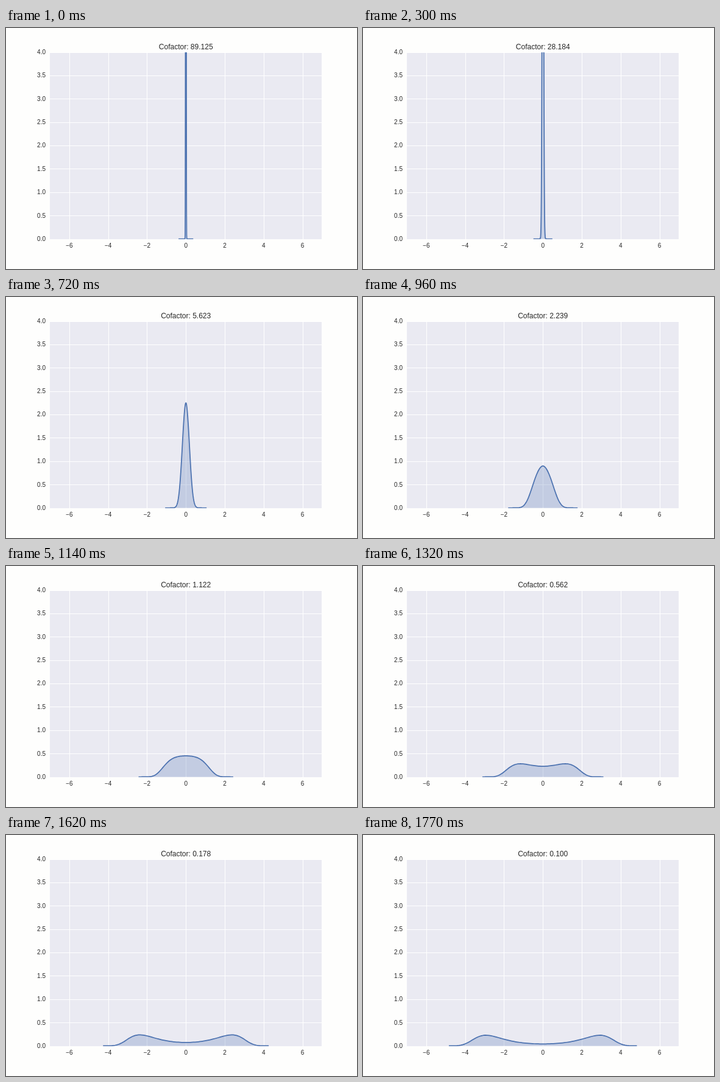
An HTML page for the animation above (1800 ms loop, 576 px wide and 396 px high).

```html
<!DOCTYPE html>
<html lang="en">
<head>
<meta charset="utf-8">
<title>Cofactor density</title>
<style>
  html, body { margin: 0; width: 576px; height: 396px; overflow: hidden; background: #fefefd; }
  svg { display: block; }
  text { font: 10px "Liberation Sans", Arial, sans-serif; fill: #262626; }
  #title { font-size: 12px; }
  #grid { stroke: #fff; stroke-width: 1; }
  #area { fill: #4c72b0; fill-opacity: .25; }
  #line { fill: none; stroke: #4c72b0; stroke-width: 1.75; stroke-linejoin: round; stroke-linecap: square; }
</style>
</head>
<body>
<svg width="576" height="396" viewBox="0 0 576 396">
  <clipPath id="axes"><rect x="72" y="40" width="446" height="307"/></clipPath>
  <rect x="72" y="40" width="446" height="307" fill="#eaeaf2"/>
  <g clip-path="url(#axes)">
    <g id="grid"></g>
    <path id="area"/>
    <path id="line"/>
  </g>
  <g id="labels"></g>
  <text id="title" x="295.2" y="35" text-anchor="middle"></text>
</svg>
<script>
const STEP = 30, STEPS = 60;
const POINTS = 100;   // samples along the curve
const REACH = 4.55;   // largest raw value
const CUT = 0.3;      // extra tail on each side
const SMOOTH = 0.1;   // kernel width relative to the spread

const byId = id => document.getElementById(id);
const px = x => 295.2 + x * 446.4 / 14;
const py = y => 346.5 - y * 306.9 / 4;
const gauss = x => Math.exp(-x * x / 2) / Math.sqrt(2 * Math.PI);

function add(parent, tag, attrs, text = "") {
  const el = document.createElementNS("http://www.w3.org/2000/svg", tag);
  for (const key in attrs) el.setAttribute(key, attrs[key]);
  el.textContent = text;
  byId(parent).append(el);
}

function drawAxes() {
  for (let v = -6; v <= 6; v += 2) {
    const x = Math.round(px(v)) + 0.5;
    add("grid", "line", { x1: x, x2: x, y1: 40, y2: 347 });
    add("labels", "text", { x: px(v), y: 361, "text-anchor": "middle" }, String(v).replace("-", "\u2212"));
  }
  for (let v = 0; v <= 4; v += 0.5) {
    const y = Math.round(py(v)) + 0.5;
    add("grid", "line", { x1: 72, x2: 518, y1: y, y2: y });
    add("labels", "text", { x: 65, y: Math.round(py(v) + 3.4), "text-anchor": "end" }, v.toFixed(1));
  }
}

// Spread of asinh(x / c) for normal x
function spread(c) {
  let sum = 0;
  for (let x = -5; x <= 5; x += 0.02) sum += Math.asinh(x / c) ** 2 * gauss(x) * 0.02;
  return Math.sqrt(sum);
}

// Density of asinh(x / c), with a slight surplus of samples near zero
function density(y, c) {
  const x = c * Math.sinh(y);
  return gauss(x) * (1 + 0.01 * Math.exp(-16 * x * x)) * c * Math.cosh(y);
}

function smoothed(y, c, width) {
  let sum = 0;
  for (let k = -20; k <= 20; k++) {
    const u = k / 5;
    sum += density(y - u * width, c) * gauss(u) / 5;
  }
  return sum;
}

function curve(c) {
  const width = SMOOTH * spread(c);
  const end = Math.asinh(REACH / c) + CUT;
  const points = [];
  for (let i = 0; i < POINTS; i++) {
    const x = end * (2 * i / (POINTS - 1) - 1);
    points.push(px(x).toFixed(3) + "," + py(smoothed(x, c, width)).toFixed(3));
  }
  return { line: "M" + points.join("L"), end };
}

let shown = -1;
function render(time) {
  const step = Math.floor(time / STEP) % STEPS;
  if (step === shown) return;
  shown = step;
  const c = 10 ** (1.95 - 0.05 * step);
  const { line, end } = curve(c);
  byId("line").setAttribute("d", line);
  byId("area").setAttribute("d", `${line}L${px(end)},${py(0)}L${px(-end)},${py(0)}Z`);
  byId("title").textContent = "Cofactor: " + c.toFixed(3);
}

drawAxes();
render(0);
requestAnimationFrame(function tick() {
  render(performance.now());
  requestAnimationFrame(tick);
});
</script>
</body>
</html>
```
